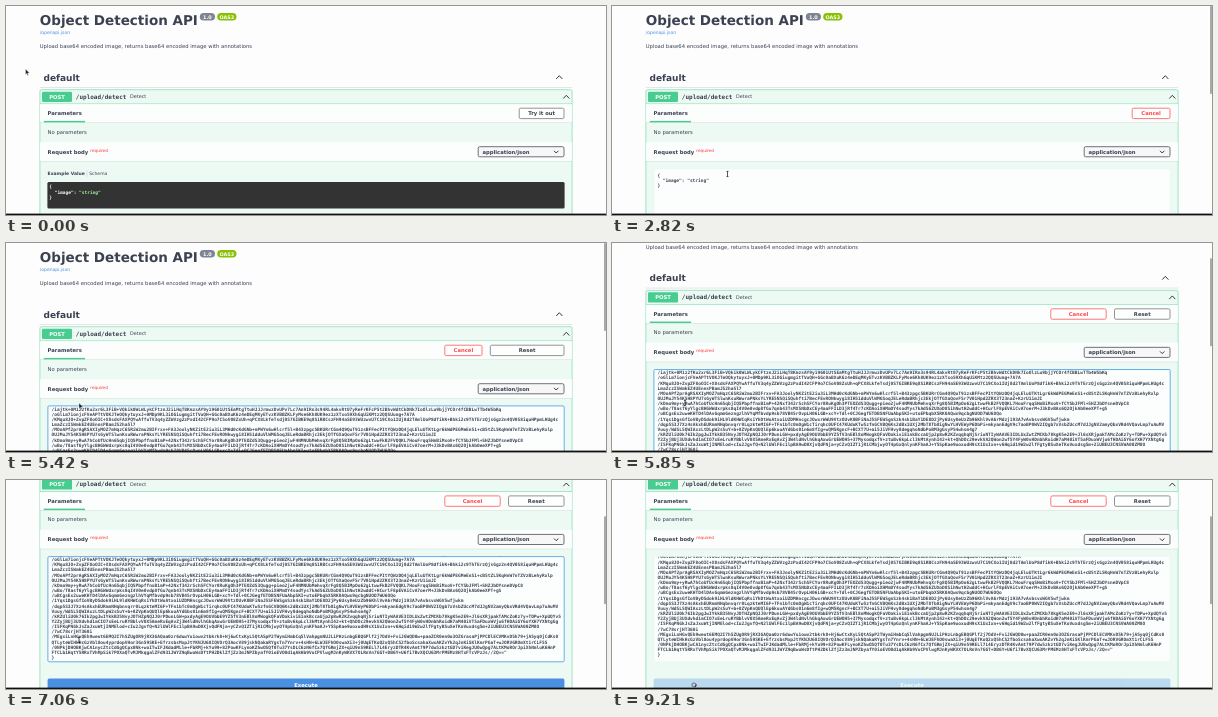
An HTML page that plays this animation: 600x209 px, repeating every 9.24 s.

```html
<!DOCTYPE html>
<html lang="en">
<head>
<meta charset="utf-8">
<title>API docs</title>
<style>
html, body { margin: 0; width: 100%; height: 100%; overflow: hidden; background: #fdfdfe; }
svg { display: block; width: 600px; height: 209px; }
text { font-family: "DejaVu Sans", sans-serif; font-size: 5.25px; fill: #3b4151; text-rendering: geometricPrecision; white-space: pre; }
.b { font-weight: 700; }
.m { font-family: "DejaVu Sans Mono", monospace; font-weight: 700; font-size: 4.5px; }
.mid { text-anchor: middle; }
.chev { fill: none; stroke: #222; stroke-width: .9; }
</style>
</head>
<body>
<svg viewBox="0 0 600 209">
  <defs>
    <clipPath id="areaClip"><rect x="42" y="163" width="516" height="105"/></clipPath>
  </defs>
  <g id="page">
    <text class="b" x="33.75" y="19" style="font-size:13.5px">Object Detection API</text>
    <rect x="193.8" y="6.9" width="15.2" height="7.6" rx="3.8" fill="#7d8492"/>
    <text class="b mid" x="201.4" y="12.6" style="font-size:4.9px;fill:#fff">1.0</text>
    <rect x="211.2" y="6.9" width="19.3" height="7.6" rx="3.8" fill="#89bf04"/>
    <text class="b mid" x="220.9" y="12.6" style="font-size:4.9px;fill:#fff">OAS3</text>
    <text x="33.75" y="28.2" style="font-size:4.5px;fill:#4990e2">/openapi.json</text>
    <text x="33.75" y="42.2">Upload base64 encoded image, returns base64 encoded image with annotations</text>

    <text class="b" x="37.5" y="74.8" style="font-size:9px">default</text>
    <path class="chev" d="M550.2 73l3.1-3.3 3.1 3.3"/>
    <rect x="33.75" y="81.2" width="532.5" height=".4" fill="#3b4151" opacity=".3"/>

    <rect x="33.9" y="83.7" width="532.2" height="260" rx="1.5" fill="#edfaf4" stroke="#49cc90" stroke-width=".5"/>
    <rect x="36" y="85.7" width="30" height="10.2" rx="1.2" fill="#49cc90"/>
    <text class="b mid" x="51" y="92.7" style="fill:#fff">POST</text>
    <text class="m" x="69.8" y="92.7" style="font-size:6px">/upload/detect</text>
    <text x="124" y="92.4" style="font-size:4.875px">Detect</text>
    <path class="chev" d="M557.3 92.5l3-3.2 3 3.2"/>
    <rect x="34" y="97.7" width="532" height=".5" fill="#49cc90"/>

    <rect x="34.1" y="98.2" width="531.8" height="18.2" fill="#fbfefd"/>
    <rect x="34.1" y="116.4" width="531.8" height=".6" fill="#000" opacity=".1"/>
    <text class="b" x="41.6" y="109.4">Parameters</text>
    <rect x="37.8" y="114.9" width="41.2" height="1.5" fill="#49cc90"/>
    <text x="41.6" y="127.6">No parameters</text>

    <rect x="34.1" y="136.2" width="531.8" height="18.8" fill="#fbfefd"/>
    <rect x="34.1" y="155" width="531.8" height=".6" fill="#000" opacity=".1"/>
    <text class="b" x="41.6" y="147.5">Request body</text>
    <text x="84.3" y="145.6" style="font-size:4.2px;fill:#f33">required</text>
    <rect x="472.2" y="140.7" width="85.8" height="10.1" rx="1.5" fill="#f7f7f7" stroke="#41444e" stroke-width=".75"/>
    <text class="b" x="476.4" y="147.6">application/json</text>
    <path class="chev" d="M548 144.8l2.2 2.2 2.2-2.2"/>

    <g id="buttons"></g>

    <g id="sample">
      <text class="b" x="41.6" y="169.4" style="font-size:4.5px">Example Value</text>
      <rect x="80.8" y="164.8" width=".35" height="6" fill="#3b4151" opacity=".4"/>
      <text x="83.2" y="169.4" style="font-size:4.5px">Schema</text>
      <rect x="41.4" y="175.9" width="517.2" height="26.6" rx="1.5" fill="#333"/>
      <text class="m" x="43.3" y="182" style="fill:#fff">{</text>
      <text class="m" x="43.3" y="187.5" style="fill:#fff">  "image": <tspan fill="#a2fca2">"string"</tspan></text>
      <text class="m" x="43.3" y="193" style="fill:#fff">}</text>
    </g>

    <g id="editor">
      <rect id="area" x="41.9" y="162.9" width="516.3" height="105.2" rx="1.2" fill="#fbfefd"/>
      <g clip-path="url(#areaClip)">
        <g id="mark" fill="#b4d5fe">
          <rect x="45.4" y="166.1" width="3.2" height="5.4"/>
          <rect x="45.4" y="171.5" width="51.6" height="5.4"/>
          <rect x="45.4" y="176.9" width="2.8" height="5.4"/>
        </g>
        <g id="short">
          <text class="m" x="45.4" y="170.5">{</text>
          <text class="m" x="45.4" y="175.9">  "image": "string"</text>
          <text class="m" x="45.4" y="181.3">}</text>
        </g>
        <g id="long"></g>
      </g>
      <g id="run">
        <rect x="41.6" y="284.8" width="516.8" height="13" rx="1.5" fill="#4990e2"/>
        <text class="b mid" x="300" y="292.9" style="fill:#fff">Execute</text>
      </g>
    </g>
  </g>

  <rect id="bar" x="598" y="0" width="2" height="88" rx=".8" fill="#a9a9a9"/>
  <rect x="0" y="207.6" width="600" height="1.4" fill="#111"/>

  <g id="pointer">
    <path id="arrow" d="M0 0v5.6l1.3-1.2.9 2 .9-.4-.9-1.9h1.8z" fill="#222" stroke="#fff" stroke-width=".35"/>
    <path id="beam" d="M-1-2.6h2M0-2.6v5.2M-1 2.6h2" fill="none" stroke="#111" stroke-width=".7"/>
    <path id="hand" d="M-.6-2.8q.6-.6 1.1 0v2l2 .5q.8.2.7 1.1l-.5 2.2h-3l-1.7-2.4q0-.8.8-.6l.6.5z" fill="#445" stroke="#223" stroke-width=".5"/>
    <g id="busy">
      <circle r="2.1" fill="#c3ced6" stroke="#667" stroke-width=".9"/>
      <path id="spin" d="M0-2.1a2.1 2.1 0 0 1 2.1 2.1" fill="none" stroke="#223" stroke-width=".9"/>
    </g>
  </g>
</svg>
<script>
const LOOP = 9240, OPEN = 1910, FOCUS = 2910, SELECT = 3250, PASTE = 4700, BLUR = 7980, RUN = 8400;
const NS = "http://www.w3.org/2000/svg";
const $ = id => document.getElementById(id);

function add(parent, tag, attrs, text = "") {
  const el = document.createElementNS(NS, tag);
  for (const k in attrs) el.setAttribute(k, attrs[k]);
  el.textContent = text;
  return parent.appendChild(el);
}
const show = (id, on) => { $(id).style.display = on ? "" : "none"; };

// Pasted base64: known line starts, seeded filler up to each length
const heads = [
  ["/iajtk+0M1z2fKu2xr6L3FiB+VQkik0WLWLykCFtznJ2iLHqT8Kmzs", 166], ["/oGlLm7ionjcFVeAPTtVOKJTeOQkytuyxJ+0MDp9KL3iOGi", 134],
  ["/KMqu8JO+ZvpZF8oOIC+X8sdsFAXPQYwAffuTV3q4yZZWVzg2", 187], ["LmaZczISWmkEZ4UEnnsPBamJS2ha5l7", 31],
  ["/MOoAPf2prAgRSAXIyMOZ7mHqzC6SRiW2mu2BIFrxv+FA3Jooly", 185], ["OUJMuJY54K5H8PYU7sGyWTSlwnKsuRWwr", 142],
  ["/kDmo9my+yRwA7hCoUfUcHn65qbjIQ", 174], ["/wBo/T8asf6yYlgcBHGWWdxr", 166], ["/uBCgsEx", 127],
  ["/1Yqs1DgsGf", 152], ["/dqp5S3J7Xz4sAkx", 187], ["Vuuy/WdSL5QWIAxz", 118], ["/kRZUliU0", 188], ["Y2ZyjBUj3U", 187],
  ["/I5FKqPNGkJsZaJx", 180], ["/7wC78srjHT360i", 15], ["/MEgxiLnH", 187], ["QTLyteWIHkHc", 183], ["/0NPkjDHOBKj", 186], ["FTCLb1HqtY5", 168]
];
const abc = "ABCDEFGHIJKLMNOPQRSTUVWXYZabcdefghijklmnopqrstuvwxyz0123456789+";
let seed = 41;
const rand = () => (seed = seed * 16807 % 2147483647) / 2147483647;
heads.forEach(([s, n], i) => {
  const tail = i === heads.length - 1 ? 'VPzJs//2Q=="' : "";
  while (s.length + tail.length < n) s += abc[Math.floor(rand() * abc.length)];
  add($("long"), "text", { class: "m", x: 45.6, y: 167.6 + i * 5.15 }, s + tail);
});
add($("long"), "text", { class: "m", x: 45.6, y: 167.6 + heads.length * 5.15 }, "}");

function button(label, color, line) {
  const g = add($("buttons"), "g", {});
  const box = add(g, "rect", { y: 102.2, height: 10.4, rx: 1.5, fill: "#fff", "fill-opacity": .5, stroke: line, "stroke-width": .85 });
  const cap = add(g, "text", { class: "b mid", y: 109.3, style: "fill:" + color }, label);
  return (on, a, b) => {
    g.style.display = on ? "" : "none";
    box.setAttribute("x", a);
    box.setAttribute("width", b - a);
    cap.setAttribute("x", (a + b) / 2);
  };
}
const tryOut = button("Try it out", "#3b4151", "#808080");
const cancel = button("Cancel", "#ff4848", "#ff6060");
const reset = button("Reset", "#3b4151", "#808080");

// Tables of [time, value, ...]
const moves = [[30, 19.5, 63], [940, 380, 96], [1600, 535, 107], [2000, 535, 107], [2750, 115.5, 168],
  [3000, 115.5, 168], [3700, 74, 172], [4060, 74, 172], [4550, 73, 160], [7450, 73, 160], [7950, 82, 205]];
const scroll = [[5620, 0], [5850, 36.2], [6150, 86.3]];
const inner = [[6030, 0], [6210, 1.5], [6730, 1.5], [7300, 8]];
const edges = [[5500, 476, 484.3], [5800, 494.2, 502.5]];

const smooth = p => p * p * (3 - 2 * p);
const plain = p => p;
function at(table, t, ease = plain) {
  const i = table.findIndex(k => k[0] > t);
  if (i === 0) return table[0].slice(1);
  if (i < 0) return table[table.length - 1].slice(1);
  const a = table[i - 1], b = table[i], p = ease((t - a[0]) / (b[0] - a[0]));
  return a.slice(1).map((v, j) => v + (b[j + 1] - v) * p);
}

function draw(t) {
  const [top] = at(scroll, t), [dy] = at(inner, t);
  const [right, left] = at(edges, t), [x, y] = at(moves, t, smooth);
  const open = t >= OPEN, pasted = t >= PASTE, run = t >= RUN;
  const focus = t >= FOCUS && t < BLUR;

  $("page").setAttribute("transform", `translate(0 ${-top})`);
  $("long").setAttribute("transform", `translate(0 ${-dy})`);
  show("sample", !open);
  show("editor", open);
  show("short", !pasted);
  show("long", pasted);
  show("mark", t >= SELECT && !pasted);
  show("bar", t >= 60);
  $("bar").setAttribute("y", top * .42);
  $("area").setAttribute("stroke", focus ? "#57a6ea" : "#e4efea");
  $("area").setAttribute("stroke-width", focus ? .9 : .4);

  tryOut(!open, 513.2, 558);
  pasted ? cancel(true, 438.8, right) : cancel(open, 520.2, 558);
  reset(pasted, left, 558);
  $("run").setAttribute("opacity", 1 - .7 * Math.min(1, Math.max(0, (t - RUN) / 300)));

  const py = y + top;
  const inArea = open && x > 41 && x < 559 && py > 162.7 && py < 268;
  const onButton = (x > 513 && x < 558 && py > 102 && py < 113) || (open && py > 284);
  const kind = run ? "busy" : inArea ? "beam" : onButton ? "hand" : "arrow";
  for (const k of ["arrow", "beam", "hand", "busy"]) show(k, k === kind);
  $("pointer").setAttribute("transform", `translate(${x} ${y})`);
  $("spin").setAttribute("transform", `rotate(${t * .36 % 360})`);
}

const start = performance.now();
function tick(now) {
  draw(Math.max(0, now - start) % LOOP);
  requestAnimationFrame(tick);
}
draw(0);
requestAnimationFrame(tick);
</script>
</body>
</html>
```
